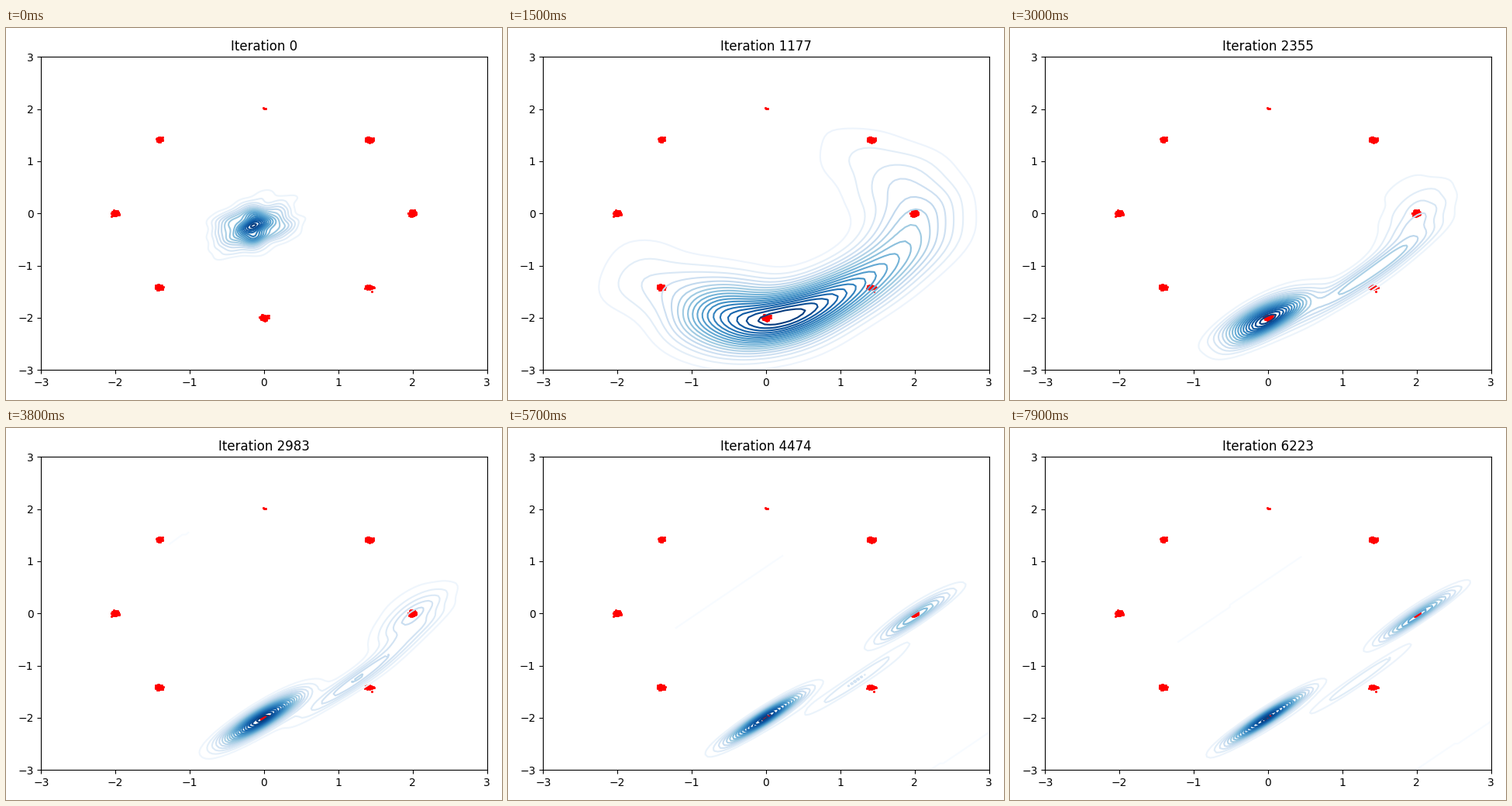
A matplotlib script that plays this animation: 640 px wide and 480 px high, repeating every 8 s.

```python
import numpy as np
import matplotlib.pyplot as plt
from matplotlib.animation import FuncAnimation

FRAMES, INTERVAL = 80, 100
COUNT, GRID = 256, 100
SCOTT = 512 ** (-1 / 6)  # Scott's bandwidth rule for a batch of 512

rng = np.random.default_rng(7)
noise = rng.normal(size=(COUNT, 2))
quantile = (np.arange(COUNT) + .5) / COUNT
angles = np.arange(-250, 111)


def decay(i, tau):
    return np.exp(-i / tau)


def bell(mass, centre, sd):
    return mass / (sd * np.sqrt(2 * np.pi)) * np.exp(-((angles - centre) / sd) ** 2 / 2)


def sample_angles(i):
    """Two modes condense out of a broad arc, leaving a bridge between them."""
    second = .33 * (1 - decay(i, 25))
    arc = .12 + .75 * decay(i, 18)
    spread = 1 / (1 + np.exp((i - 26) / 2.5))
    p = bell(1 - second - arc, -90 - 8 * decay(i, 10), 1.5 + 34 * np.exp(-(i / 19) ** 2))
    p += bell(second, 0, 1.5 + 50 * np.exp(-(i / 27) ** 2))
    p += bell(arc, -45 - 15 * spread, 18 + 36 * spread)
    p += .5 * decay(i, 5) / 360
    cdf = np.cumsum(p)
    return np.radians(np.interp(quantile, cdf / cdf[-1], angles))


def samples(i):
    """Generated points: a small cloud that grows onto the arc."""
    a = sample_angles(i)
    r = (2 - .22 * np.sin(2 * a) ** 2) * (1 + .1 * decay(i, 12))
    arc = np.column_stack([r * np.cos(a), r * np.sin(a)])
    arc += (.05 + .45 * decay(i, 14)) * noise
    cloud = noise @ [[.29, .07], [0, .25]] + [-.12, -.2]
    return cloud + (arc - cloud) * min(i / 8, 1)


def density(pts):
    """Gaussian kernel density estimate on a regular grid."""
    cov = np.cov(pts.T) * SCOTT ** 2
    pad = 3 * np.sqrt(np.diag(cov))
    lo, hi = pts.min(0) - pad, pts.max(0) + pad
    X, Y = np.meshgrid(*np.linspace(lo, hi, GRID).T)

    white = np.linalg.inv(np.linalg.cholesky(cov)).T
    mean = pts.mean(0)
    g = (np.column_stack([X.ravel(), Y.ravel()]) - mean) @ white
    p = (pts - mean) @ white
    power = g @ p.T
    power -= (g ** 2).sum(1)[:, None] / 2
    power -= (p ** 2).sum(1) / 2
    Z = np.exp(power, out=power).mean(1)
    Z /= 2 * np.pi * np.sqrt(np.linalg.det(cov))
    return X, Y, Z.reshape(X.shape)


def real_samples():
    """Noisy points around eight modes on a circle, unevenly filled."""
    counts = [170, 180, 3, 50, 170, 110, 180, 50]
    a = np.repeat(np.arange(8) * np.pi / 4, counts)
    return 2 * np.array([np.cos(a), np.sin(a)]) + rng.normal(0, .022, (2, a.size))


fig, ax = plt.subplots(figsize=(6.4, 4.8), dpi=100)
ax.scatter(*real_samples(), s=3, c="red", linewidths=.5)
ax.set(xlim=(-3, 3), ylim=(-3, 3))
title = ax.set_title("Iteration 0")
fig.tight_layout()


def update(i):
    for old in list(ax.collections)[1:]:
        old.remove()
    ax.contour(*density(samples(i)), 20, cmap="Blues")
    title.set_text(f"Iteration {int(78.5 * i + 2 * max(0, i - 68))}")
    return []


anim = FuncAnimation(fig, update, frames=FRAMES, interval=INTERVAL,
                     init_func=lambda: [], repeat=True, repeat_delay=0)
plt.show()
```
